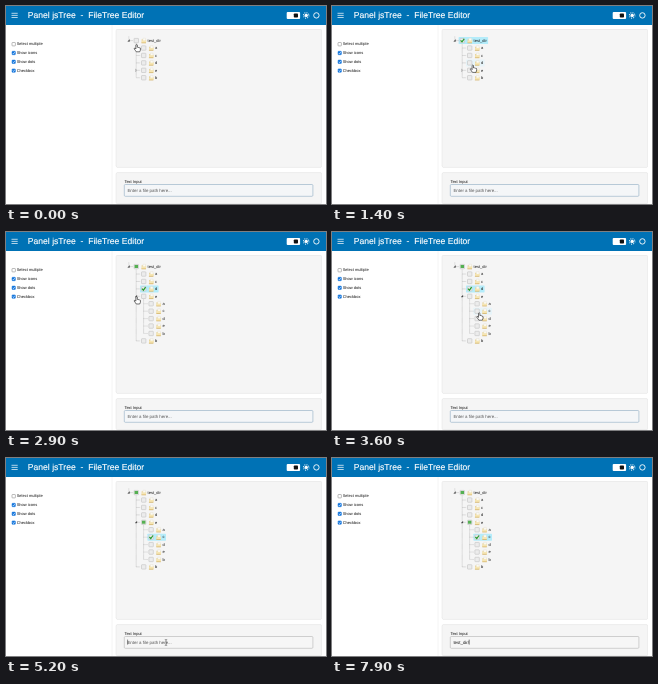
Write an HTML page that moves like this. It is 320 px wide and 198 px high and loops after 8 s.

```html
<!DOCTYPE html>
<html lang="en">
<head>
<meta charset="utf-8">
<title>FileTree Editor</title>
<style>
html, body { margin: 0; width: 100%; height: 100%; overflow: hidden; background: #fff; }
svg { display: block; width: 100vw; height: 100vh; }
text { font: 4px "Liberation Sans", Arial, sans-serif; fill: #111; white-space: pre; text-rendering: geometricPrecision; }
#title { font-size: 8.6px; fill: #fff; stroke: #fff; stroke-width: .15; }
#value { font-size: 4.4px; }
.card { fill: #f5f5f5; stroke: #ebebeb; stroke-width: .5; filter: drop-shadow(0 .3px .5px #0002); }
.dots { fill: none; stroke: #9a9a9a; stroke-width: .5; stroke-dasharray: .6 .5; }
.box { fill: #ececec; stroke: #c2c2c2; stroke-width: .6; }
.tick { fill: none; stroke: #259b2c; stroke-width: 1.2; }
</style>
</head>
<body>
<svg viewBox="0 0 320 198">
  <defs>
    <g id="folder">
      <path d="M-2.2-1.4h1.6l.5.6h2.3v3.1h-4.4z" fill="#ead7a0"/>
      <path d="M-.9-2.4h2.7v2.8h-2.7z" fill="#fbfaf3" stroke="#d8d3c2" stroke-width=".3"/>
      <path d="M-2.2 2.3l.4-2.4h4.4l-.5 2.4z" fill="#f6e6b4"/>
      <path d="M-2.3 2.3h4.5" stroke="#c9a350" stroke-width=".6"/>
    </g>
    <path id="hand" d="M-.7.5Q0-.5.7.5V2.8Q1.5 2.3 1.8 3.1 2.6 2.7 2.9 3.4 3.9 3.2 3.9 4.3 3.9 6.2 3.1 7.4H-.3Q-1.2 6-2.4 4.5-2.5 3.4-1.4 3.9L-.7 4.6Z" fill="#fff" stroke="#111" stroke-width=".6"/>
    <path id="arrow" d="M0 0V7.2L1.7 5.7 2.8 8.2 4 7.7 2.9 5.2H5.1Z" fill="#000" stroke="#fff" stroke-width=".5"/>
    <path id="beam" d="M-1.2-3Q0-3 0-2.3 0-3 1.2-3M0-2.3V2.3M-1.2 3Q0 3 0 2.3 0 3 1.2 3" fill="none" stroke="#333" stroke-width=".5"/>
  </defs>
  <rect width="320" height="198" fill="#fff"/>
  <path d="M106 19V198" stroke="#f1f1f1" stroke-width=".8"/>
  <rect class="card" x="110.2" y="23.5" width="205.5" height="137.7" rx="1.3"/>
  <rect class="card" x="110.2" y="166.7" width="205.5" height="30.8" rx="1.3"/>
  <rect width="320" height="19" fill="#0072b5" style="filter:drop-shadow(0 .3px .5px #0003)"/>
  <path d="M5.5 7.3h6.2M5.5 9.4h6.2M5.5 11.5h6.2" stroke="#fff" stroke-width=".7"/>
  <text id="title" x="21.8" y="12.3">Panel jsTree  -  FileTree Editor</text>
  <rect x="280.7" y="5.9" width="13.4" height="7.2" rx="1" fill="#fff"/>
  <rect x="287.8" y="7.4" width="4.2" height="4.1" rx=".8" fill="#111"/>
  <circle cx="300.2" cy="9.4" r="1.7" fill="#fff"/>
  <circle cx="300.2" cy="9.4" r="2.7" fill="none" stroke="#fff" stroke-width="1.1" stroke-dasharray=".9 1.22"/>
  <circle cx="310.4" cy="9.4" r="2.7" fill="none" stroke="#fff" stroke-width=".9"/>
  <g id="options"></g>
  <text x="118.4" y="176.6">Text Input</text>
  <rect id="field" x="118.3" y="178.5" width="188.6" height="11.8" rx="1" stroke-width=".6"/>
  <text id="value" x="121.4" y="185.8"></text>
  <path id="caret" d="M0 182v5" stroke="#111" stroke-width=".5"/>
  <g id="tree"></g>
  <use id="cursor"/>
</svg>
<script>
const $ = id => document.getElementById(id);
const LOOP = 8000, ROW = 7.43, TOP = 34.6;
const CHECK_ROOT = 700, CHECK_D = 1800, EXPAND = 2900, CHECK_C = 3800, FOCUS = 5200;

// time, x, y of the pointer tip
const path = [
  [0, 130.6, 38.4], [100, 130.6, 38.4], [600, 130.3, 34.5], [900, 130.8, 35], [1400, 140.8, 59],
  [1700, 138.2, 57.3], [1900, 138.2, 57.3], [2300, 132.3, 65.5], [2700, 130.6, 64.6],
  [2900, 130.6, 64.6], [3600, 147.2, 80.8], [3700, 146, 79.8], [4200, 146, 79.8],
  [4500, 154.6, 158.2], [5100, 160, 184.5], [LOOP, 160, 184.5]
];
const keys = [5600, 5900, 6200, 6300, 6800, 7200, 7400, 7600, 7800];

$('options').innerHTML = ['Select multiple', 'Show icons', 'Show dots', 'Checkbox'].map((label, i) => {
  const y = 38.2 + i * 8.8;
  const paint = i ? 'fill="#1275dc" stroke="#1275dc"' : 'fill="#fff" stroke="#777"';
  return `<rect x="6" y="${y - 1.7}" width="3.4" height="3.4" rx=".6" stroke-width=".5" ${paint}/>` +
    (i ? `<path d="M6.7 ${y}l.8.9 1.3-1.8" fill="none" stroke="#fff" stroke-width=".6"/>` : '') +
    `<text x="10.7" y="${y + 1.2}">${label}</text>`;
}).join('');

function pointerAt(t) {
  const i = path.findIndex(p => p[0] > t);
  const [a, x, y] = path[i - 1], [b, x2, y2] = path[i];
  const k = (t - a) / (b - a), e = k * k * (3 - 2 * k);
  return [x + (x2 - x) * e, y + (y2 - y) * e];
}

function rowsAt(t) {
  const root = t >= CHECK_ROOT && t < CHECK_D ? 'on' : t >= CHECK_D ? 'part' : '';
  const row = (name, depth, check = '', open) => ({ name, depth, check, open });
  const rows = [row('test_dir', 0, root, true)];
  for (const n of 'acdeb') {
    const isE = n === 'e', open = isE && t >= EXPAND;
    const on = n === 'd' && t >= CHECK_D && t < CHECK_C;
    rows.push(row(n, 1, on ? 'on' : isE && t >= CHECK_C ? 'part' : '', isE ? open : undefined));
    if (open) for (const m of 'acdeb') rows.push(row(m, 2, m === 'c' && t >= CHECK_C ? 'on' : ''));
  }
  return rows;
}

function drawRow({ name, depth, check, open }, i, px, py) {
  const x = 130.2 + depth * 7.4, y = TOP + i * ROW, width = depth ? 18.6 : 29.5;
  const hover = px > x - 3 && px < x + width && Math.abs(py - y) < ROW / 2;
  const fill = check === 'on' ? '#b4ecfa' : hover ? '#e7f4f9' : 'none';
  let s = `<rect x="${x - 3.6}" y="${y - 3.5}" width="${width}" height="7" rx=".6" fill="${fill}"/>` +
    `<path class="dots" d="M${x - 7.4} ${y}h4.4"/>` +
    `<rect class="box" x="${x - 2.1}" y="${y - 2.2}" width="4.4" height="4.4" rx=".5"/>`;
  if (check === 'on') s += `<path class="tick" d="M${x - 1.6} ${y - .2}l1.4 1.5 2.2-3"/>`;
  if (check === 'part') s += `<rect x="${x - 1.6}" y="${y - 1.6}" width="3.4" height="3" fill="#55b052"/>`;
  if (open !== undefined) {
    const shape = open ? 'm.8 -1.1v1.9h-1.9z' : 'm-.7 -1.2l1.5 1.2-1.5 1.2z';
    s += `<path d="M${x - 7.4} ${y}${shape}" fill="${open ? '#444' : '#fff'}" stroke="#555" stroke-width=".3"/>`;
  }
  return s + `<use href="#folder" x="${x + 7.6}" y="${y}"/>` +
    `<text x="${x + 11.4}" y="${y + 1.2}">${name}</text>`;
}

function draw(t) {
  const [px, py] = pointerAt(t), rows = rowsAt(t), last = TOP + (rows.length - 1) * ROW;
  let lines = `M122.8 ${TOP - 4}V${TOP}M130.2 ${TOP + 3}V${last}`;
  if (t >= EXPAND) lines += `M137.6 ${TOP + 4 * ROW + 3}V${TOP + 9 * ROW}`;
  $('tree').innerHTML = `<path class="dots" d="${lines}"/>` +
    rows.map((r, i) => drawRow(r, i, px, py)).join('');

  const typed = 'test_dir/'.slice(0, keys.filter(k => t >= k).length);
  const focused = t >= FOCUS, value = $('value');
  value.textContent = typed || 'Enter a file path here...';
  value.style.fill = typed ? '#111' : '#555';
  $('field').setAttribute('fill', focused ? '#f6f6f6' : '#f4f6f8');
  $('field').setAttribute('stroke', focused ? '#b4b4b4' : '#8fabc3');
  $('caret').setAttribute('visibility', focused ? 'visible' : 'hidden');
  $('caret').setAttribute('transform', `translate(${121.6 + (typed && value.getComputedTextLength())} -.4)`);

  const cursor = $('cursor');
  cursor.setAttribute('href', py < 112 ? '#hand' : py < 178.6 ? '#arrow' : '#beam');
  cursor.setAttribute('transform', `translate(${px} ${py})`);
  cursor.setAttribute('visibility', t < keys[0] ? 'visible' : 'hidden');
}

const start = performance.now();
function frame() {
  draw((performance.now() - start) % LOOP);
  requestAnimationFrame(frame);
}
frame();
</script>
</body>
</html>
```
